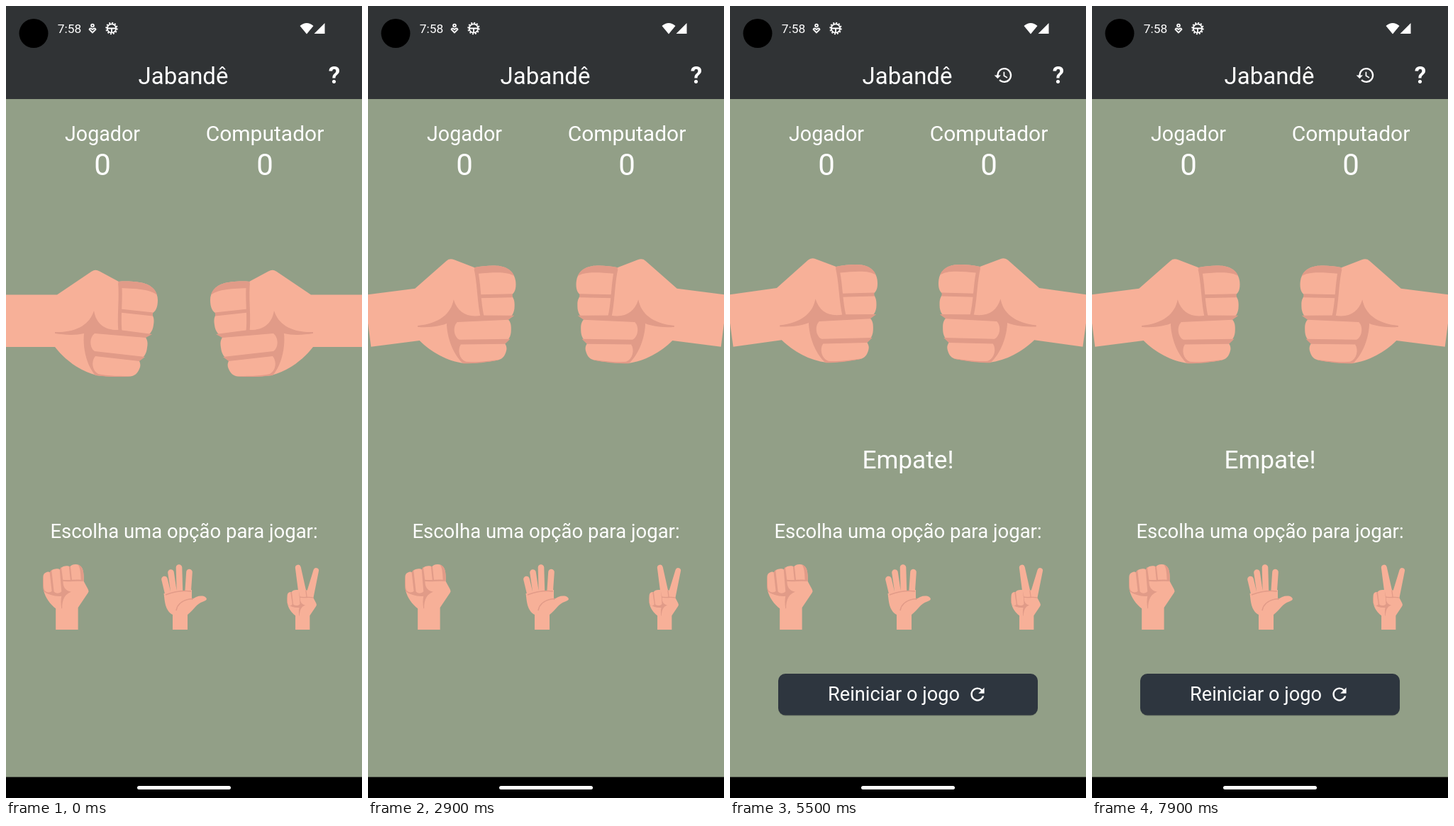
An HTML page for the animation above (8000 ms loop, 502 by 1115 pixels).

```html
<!DOCTYPE html>
<html lang="pt-BR">
<head>
<meta charset="utf-8">
<title>Jabandê</title>
<style>
  html, body { margin: 0; width: 100%; height: 100%; overflow: hidden; background: #929f87; }
  svg { display: block; width: 502px; height: 1115px; font-family: Roboto, "Open Sans", sans-serif; }
  text { fill: #fff; text-anchor: middle; }
  .skin { fill: #f7b098; }
  .shade { fill: #e19b88; }
  .crease { fill: none; stroke: #e19b88; stroke-width: 5; }
  .thin { stroke-width: 3; }
  .hair { stroke-width: 1.5; }
  .white { fill: #fff; }
  .line { fill: none; stroke: #fff; stroke-width: 1.8; }
  .finger { fill: none; stroke: #f7b098; stroke-width: 8.6; stroke-linecap: round; }
</style>
</head>
<body>
<svg viewBox="0 0 502 1115">
  <defs>
    <g id="rock">
      <path class="skin" d="M0 406.500H72L121 373.500Q126 370 132 373.500L159 388C172 387 186 388 195 390.500C207 394 214 403 214 414C214 424 211 431 205 433C209 438 209 443 208 449C207 458 202 464 196 465.500C200 470 200 475 199 481C198 490 194 496 187 498C190 503 190 507 188 511C185 518 181 521 174 521.500C158 522 143 522 128 520C104 514 83 498 69 480H0Z"/>
      <path class="shade" d="M158 388C172 387 186 388 195 390.500C205 393.500 211 399 213 407C205 400 190 398 161 397Z"/>
      <path class="shade" d="M69 459C100 460 118 448 124 429C127 448 140 457 160 456L206 462L197 467L125 461C117 467 118 482 125 486L196 494L188 500L126 493C120 500 121 513 130 518C142 521 165 521 178 521C160 523 141 522 126 520C113 505 108 480 110 461C98 464 82 463 69 461Z"/>
      <path class="crease" d="M160.500 390C163 412 158.500 435 161 458M161 429L207 434"/>
    </g>
    <g id="scissors">
      <path class="skin" d="M0 424H46L77 403Q82 400 87 403L104 412L190 394.500A9 9 0 0 1 196 411.500L130 432Q127 435 131 437L206 454A9.500 9.500 0 0 1 203 472.500L130 463C131 473 130 481 123 484.500C124 493 120 499 111 499C101 499.500 92 500 84 498C68 494 55 484 46 472H0Z"/>
      <path class="shade" d="M45 458C64 458 75 452 80 439C83 453 94 457 106 456L128 461L106 458L84 457C77 463 78 476 83 479L124 484L122 488L83 482C76 487 78 495 84 497.500L112 499C98 500 89 499.500 83 498C75 488 71 475 72 459C64 461 53 461 45 459Z"/>
      <path class="crease thin" d="M104.500 412C108 427 104 442 106.500 458M106 434L129 437"/>
    </g>
    <g id="paper">
      <path class="finger" d="M223.500 807L229.500 832M232.500 797.500L237 828M244 790.500L245 826M258.500 797L256.500 826"/>
      <path class="skin" d="M222.500 827L262 822V836C267 831 276 829 281 832Q286 836 278 838.500C269 841 265 850 256 857V878H235V857C224 851 224 838 222.500 827Z"/>
      <path class="crease hair" d="M225 829Q244 822 261 824M240 851C242 840 252 835 264 834.500"/>
    </g>
  </defs>

  <rect width="502" height="1115" fill="#929f87"/>
  <rect width="502" height="131" fill="#303335"/>
  <rect y="1085.500" width="502" height="30"/>
  <rect class="white" x="185" y="1098" width="132" height="5" rx="2.500"/>

  <circle cx="39" cy="38.500" r="20.500"/>
  <text x="89.500" y="38" font-size="17.400">7:58</text>
  <g class="line">
    <circle cx="122" cy="27.500" r="1.900"/>
    <path d="M122 37.500L117.500 33Q118.500 30 122 33Q125.500 30 126.500 33Z"/>
    <circle cx="149" cy="31.500" r="6.200"/>
    <circle cx="149" cy="31.500" r="7.800" stroke-dasharray="2.040 2.040"/>
    <path d="M143 31.500H155M149 32V37"/>
  </g>
  <path class="white" d="M414.500 28Q424 20 433.500 28L424 39.500ZM434.500 39H449.500V24Z"/>

  <text x="250" y="110" font-size="33">Jabandê</text>
  <text x="463" y="109" font-size="33" font-weight="700">?</text>

  <text x="136" y="190" font-size="28.600">Jogador</text>
  <text x="365" y="190" font-size="30">Computador</text>
  <text x="136" y="237.500" font-size="42">0</text>
  <text x="365" y="237.500" font-size="42">0</text>

  <g id="left"><use class="hand" href="#rock"/></g>
  <g transform="matrix(-1 0 0 1 502 0)"><g id="right"><use class="hand" href="#rock"/></g></g>

  <text x="251" y="749" font-size="27.500">Escolha uma opção para jogar:</text>
  <use href="#rock" transform="matrix(0 -.430 -.428 0 275.600 878)"/>
  <use href="#paper"/>
  <use href="#scissors" transform="matrix(0 -.430 -.423 0 607.700 878)"/>

  <g id="result">
    <path class="white" transform="translate(371.500 83.500) scale(1.170)" d="M13 3a9 9 0 0 0-9 9H1l3.890 3.890.070.140L9 12H6a7 7 0 1 1 7 7c-1.930 0-3.680-.790-4.940-2.060l-1.420 1.420A9 9 0 1 0 13 3zm-1 5v5l4.280 2.540.720-1.210-3.500-2.080V8z"/>
    <text x="251" y="651" font-size="35.200">Empate!</text>
    <rect x="68" y="941.500" width="366" height="58" rx="10" fill="#000" opacity=".15"/>
    <rect x="68" y="940" width="366" height="58.500" rx="10" fill="#2e363f"/>
    <text x="231" y="978" font-size="27.200">Reiniciar o jogo</text>
    <path class="white" transform="translate(334.600 954.600) scale(1.200)" d="M17.650 6.350A8 8 0 1 0 19.730 14h-2.080A6 6 0 1 1 12 6c1.660 0 3.140.690 4.220 1.780L13 11h7V4z"/>
  </g>
</svg>
<script>
  const LOOP = 8000, STEP = 100;
  const SWING = 390, MAX_ANGLE = 9.2;
  const PIVOT = '0 446.5';
  // Each round: first visible step, start of the swing, moment of the result.
  const rounds = [
    { from: 1800, start: 1810, end: 3300, hand: 'scissors' },
    { from: 4500, start: 4390, end: 5900, hand: 'rock' },
    { from: 7600, start: 7590, end: 9000, hand: 'rock' }
  ];
  const left = document.getElementById('left');
  const right = document.getElementById('right');
  const result = document.getElementById('result');
  const hands = document.querySelectorAll('.hand');

  // Triangle wave: up for SWING ms, down for SWING ms.
  function swingAngle(ms) {
    const phase = Math.max(0, ms) / SWING % 2;
    return MAX_ANGLE * (phase < 1 ? phase : 2 - phase);
  }

  function draw(t) {
    let hand = 'rock', angle = 0;
    for (const r of rounds) {
      if (t >= r.end) {
        hand = r.hand;
        angle = 0;
      } else if (t >= r.from) {
        hand = 'rock';
        angle = swingAngle(t - r.start);
      }
    }
    for (const arm of [left, right]) arm.setAttribute('transform', `rotate(${-angle} ${PIVOT})`);
    for (const h of hands) h.setAttribute('href', '#' + hand);
    result.style.display = t >= rounds[0].end ? '' : 'none';
  }

  const origin = performance.now();
  function tick() {
    const t = (performance.now() - origin) % LOOP;
    draw(Math.floor(t / STEP) * STEP);
    requestAnimationFrame(tick);
  }
  tick();
</script>
</body>
</html>
```
